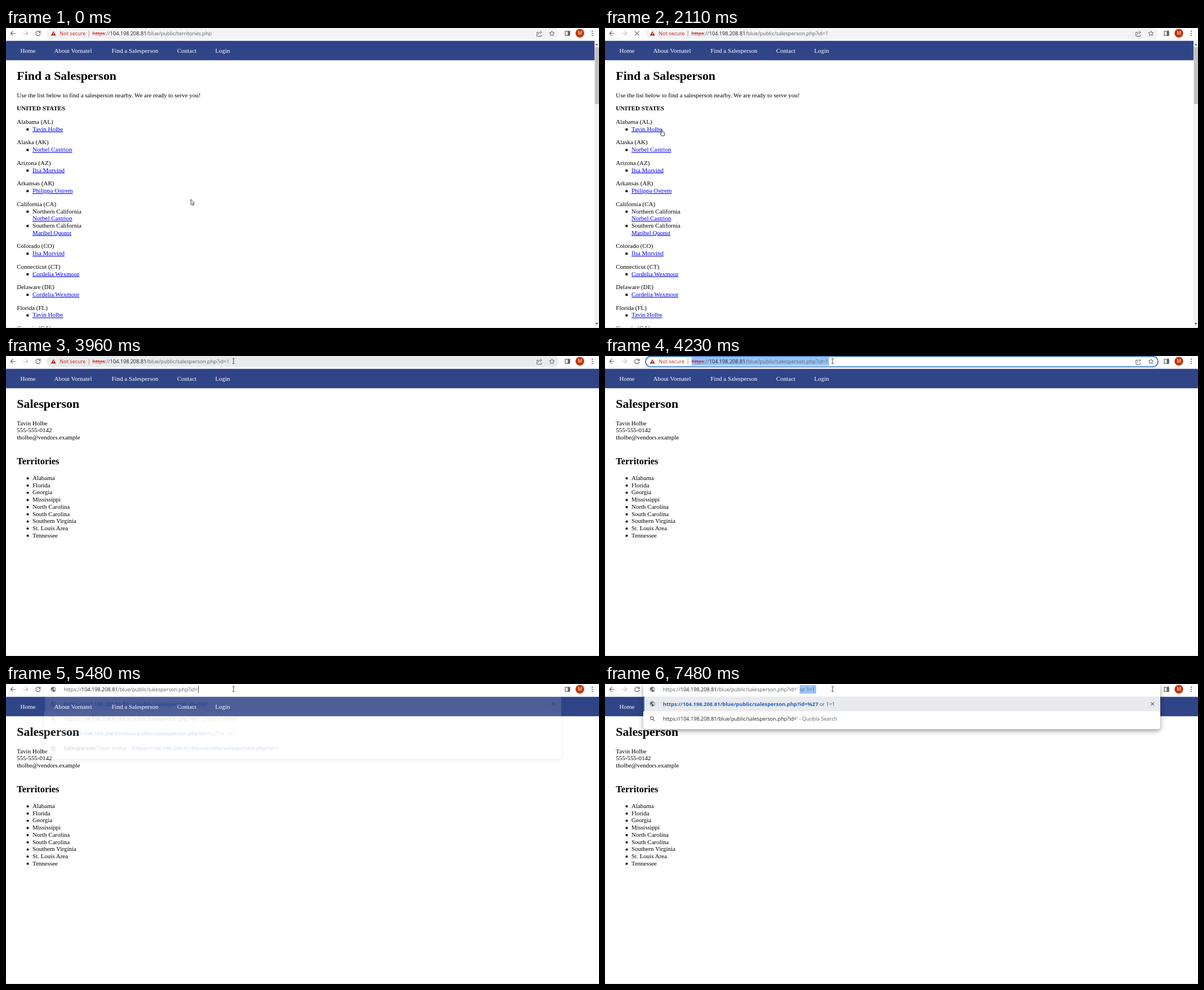
An HTML page that plays this animation: 1053x532 px, repeating every 8000 ms.

```html
<!DOCTYPE html>
<html lang="en">
<head>
<meta charset="utf-8">
<title>Find a Salesperson</title>
<style>
html, body { margin: 0; width: 100%; height: 100%; overflow: hidden; background: #fff; }
svg { display: block; width: 100vw; height: 100vh; }
.page { font: 10.97px "Liberation Serif", serif; fill: #000; }
.ui { font: 9.14px "Open Sans", sans-serif; fill: #5f6368; }
.h1 { font-size: 21.94px; font-weight: bold; }
.h2 { font-size: 16.45px; font-weight: bold; }
.b { font-size: 9.34px; font-weight: bold; }
.link { fill: #0000ee; text-decoration: underline; }
.nav { fill: #fff; }
.dark { fill: #202124; }
.red { fill: #c5221f; }
.blue { fill: #1b5fc9; }
.line { fill: none; stroke: #5f6368; stroke-width: 1.2; }
.struck { text-decoration: line-through; }
</style>
</head>
<body>
<svg id="stage" viewBox="0 0 1053 532" preserveAspectRatio="none"></svg>
<script>
const LOOP = 8000;
const LINE = 12.7;
const AGENT = "Tavin Holbe";
const HOST = "104.198.208.81";
const PATH = "/blue/public/";
const QUERY = PATH + "salesperson.php?id=";
const URL_TEXT = "https://" + HOST + QUERY;

const text = (x, y, content, cls = "", id = "") =>
  `<text x="${x}" y="${y}" class="${cls}" id="${id}">${content}</text>`;
const rect = (x, y, w, h, fill, extra = "") =>
  `<rect x="${x}" y="${y}" width="${w}" height="${h}" fill="${fill}" ${extra}/>`;
const path = (d, extra = 'class="line"') => `<path d="${d}" ${extra}/>`;
const group = (id, content, extra = "") => `<g id="${id}" ${extra}>${content}</g>`;
const span = (cls, content) => `<tspan class="${cls}">${content}</tspan>`;

const states = [
  ["Alabama (AL)", AGENT],
  ["Alaska (AK)", "Norbel Castrion"],
  ["Arizona (AZ)", "Ilsa Morvind"],
  ["Arkansas (AR)", "Philippa Ostrem"],
  ["California (CA)", "Northern California|Norbel Castrion", "Southern California|Maribel Quonst"],
  ["Colorado (CO)", "Ilsa Morvind"],
  ["Connecticut (CT)", "Cordelia Wexmoor"],
  ["Delaware (DE)", "Cordelia Wexmoor"],
  ["Florida (FL)", AGENT],
  ["Georgia (GA)"],
];
const territories = ["Alabama", "Florida", "Georgia", "Mississippi", "North Carolina",
  "South Carolina", "Southern Virginia", "St. Louis Area", "Tennessee"];

function stateList() {
  let y = 170, out = "";
  for (const [state, ...entries] of states) {
    out += text(19.3, y, state);
    for (const entry of entries) {
      const lines = entry.split("|");
      out += rect(36.4, y + LINE - 4.7, 3.8, 3.8, "#000");
      lines.forEach((line, i) => {
        y += LINE;
        out += text(47, y, line, i === lines.length - 1 ? "link" : "");
      });
    }
    y += 23.75;
  }
  return out;
}

const navBar = rect(0, 22.5, 1053, 34.7, "#304488") +
  [[25.5, "Home"], [85.5, "About Vornatel"], [187.5, "Find a Salesperson"], [304, "Contact"], [371.5, "Login"]]
    .map(([x, label]) => text(x, 44.4, label, "nav")).join("");

const scrollbar = rect(1045, 22.5, 8, 510, "#f1f1f1") + rect(1045.7, 34, 7.3, 101, "#c1c1c1") +
  path("M1046.8 30.5h4.6l-2.3-3z", 'fill="#505050"') + path("M1046.8 523h4.6l-2.3 3z", 'fill="#505050"');

const listPage = text(19.3, 92.4, "Find a Salesperson", "h1") +
  text(19.3, 122.7, "Use the list below to find a salesperson nearby. We are ready to serve you!") +
  text(19.3, 146.3, "<tspan font-weight='bold'>UNITED STATES</tspan>") + stateList() + scrollbar;

const personPage = text(19.3, 92.4, "Salesperson", "h1") +
  [AGENT, "555-555-0142", "tholbe@vendors.example"]
    .map((line, i) => text(19.3, 122.7 + i * LINE, line)).join("") +
  text(19.3, 192.4, "Territories", "h2") +
  territories.map((name, i) => {
    const y = 220 + i * 12.73;
    return `<circle cx="38.5" cy="${y - 3}" r="2"/>` + text(47, y, name);
  }).join("");

const globe = y => `<g transform="translate(84 ${y})"><circle r="4.5" fill="#5f6368"/>` +
  path("M-3.6-.5L-1 2v1.8C-2.6 3.2-3.6 1.5-3.6-.5zM0-3.6L2-3.1 1.6-1.7 0-1.3-.2 0 1.7.3 2.2 2.2 3.5 1V-.8L2.5-2.6-1.5-3z", 'fill="#fff"') + "</g>";
const cross = (x, y, r) => path(`M${x - r} ${y - r}l${2 * r} ${2 * r}m0 ${-2 * r}l${-2 * r} ${2 * r}`);

const toolbar = rect(0, 0, 1053, 22.5, "#fff") +
  path("M17 9.5H8.5M12.5 5.3L8.3 9.5l4.2 4.2") +
  path("M30 9.5h8.5M34.5 5.3l4.2 4.2-4.2 4.2", 'class="line" style="stroke:#bdc1c6"') +
  group("reload", path("M60.3 7.2A4.1 4.1 0 1 0 60.9 10.5") + path("M61.5 4.8v3.9h-3.9z", 'fill="#5f6368"')) +
  group("stop", cross(56.8, 9.5, 3.8)) +
  rect(993, 5.8, 8, 7.4, "none", 'class="line"') + rect(997.5, 5.5, 4, 8, "#5f6368") +
  '<circle cx="1019" cy="9.2" r="7.7" fill="#bf360c"/>' +
  text(1015.2, 12.4, "<tspan fill='#fff' font-size='8.6'>M</tspan>") +
  [5.7, 9.5, 13.3].map(y => `<circle cx="1041" cy="${y}" r="1.1"/>`).join("");

const restingField = rect(72, 0, 910, 19.3, "#f1f3f4", 'rx="9.65" id="pill"') +
  rect(72, 0.6, 910, 18.6, "#fff", 'rx="9.3" stroke="#1a66d2" stroke-width="1.6" id="ring"') +
  rect(154, 2, 244, 15, "#99c3f7", 'id="selectAll"') +
  path("M84.2 5.6l4.5 8h-9z", 'class="red"') + path("M84.2 8.2v2.7m0 .8v1", 'stroke="#fff" stroke-width=".9"') +
  text(95.3, 13, "Not secure", "red", "") + rect(146.8, 5, 0.9, 10, "#a08a8a") +
  text(153.6, 13, span("red struck", "https") + "://" + span("dark", HOST) + '<tspan id="address"></tspan>') +
  rect(397.6, 3, 0.8, 13, "#202124", 'id="endCaret"') +
  path("M946 7.5h-3.2v7h8v-2.5M945 11.5c.3-2.5 2-3.8 4.5-3.8M948.3 5.3l3 2.5-3 2.5", 'class="line" style="stroke-width:1"') +
  path("M969.4 5.2l1.3 2.9 3.2.3-2.4 2.1.7 3.1-2.8-1.6-2.8 1.6.7-3.1-2.4-2.1 3.2-.3z", 'class="line" style="stroke-width:1"');

const typedField = globe(9.5) +
  text(102.8, 13, "https://" + span("dark", HOST) + QUERY + '<tspan id="quote">\'</tspan>') +
  rect(341.3, 3, 0.8, 13, "#202124", 'id="typeCaret"') +
  group("completion", rect(343, 2, 32, 15, "#99c3f7", 'id="completionMark"') + text(345.8, 13, "or 1=1"));

const rowY = i => 38.5 + i * 26.3;
const boldUrl = (x, i, tail = "") => text(x, rowY(i), span("b", URL_TEXT) + tail, "blue");
const searchRow = tail => '<circle cx="83.2" cy="60.6" r="2.7" class="line"/>' + path("M85.2 62.6l3 3") +
  text(102.8, rowY(1), span("dark", URL_TEXT + tail) + " - Quobla Search");
const personRow = globe(114) +
  text(102.8, rowY(3), span("dark b", "Salesperson") + span("dark", ": " + AGENT) + " -") + boldUrl(224, 3, "1");
const firstSuggestions = boldUrl(102.8, 0) + searchRow("") + globe(87.7) + boldUrl(102.8, 2, "%27 or 1=1") + personRow;
const quoteSuggestions = boldUrl(102.8, 0, span("b", "%27") + " or 1=1") + searchRow("'");
const olderSuggestions = globe(87.7) + boldUrl(102.8, 2) + personRow;

const dropdown = path("", 'id="panel" fill="#fff" style="filter:drop-shadow(0 3px 4px #0006)"') +
  rect(68, 22.3, 918, 26, "#e8eaed") + rect(68, 22.3, 2, 26, "#1a73e8") +
  globe(35.3) + cross(972.3, 35.3, 2.9) +
  group("first", firstSuggestions) + group("quoted", quoteSuggestions) + group("older", olderSuggestions);

const status = rect(-2, 527, 216, 12, "#dfe1e5", 'rx="2" stroke="#c8cbd0" stroke-width=".7"');

const cursors =
  group("arrow", path("M0 0v9.6l2.2-2 1.5 3.2 1.5-.7-1.4-3h2.9z", 'fill="#fff" stroke="#25233f" stroke-width=".9"')) +
  group("hand", path("M-.9 1c0-1.3 1.8-1.3 1.8 0v3.2l3.2.9c.7.2 1 .7.9 1.5l-.7 4.6h-5L-2.7 7.5c-.6-1 .6-1.6 1.8-.4z",
    'fill="#fff" stroke="#202124" stroke-width=".9"')) +
  group("beam", path("M-2-4.4h1.5l.5.5.5-.5H2M0-4v8M-2 4.4h1.5l.5-.5.5.5H2", 'fill="none" stroke="#333" stroke-width=".9"'));

document.getElementById("stage").innerHTML =
  group("pages", navBar + group("listPage", listPage) + group("personPage", personPage), 'class="page"') +
  rect(0, 530.7, 1053, 1.3, "#e3e8ea") + group("status", status) +
  group("chrome", toolbar + group("restingField", restingField) +
    group("dropdown", dropdown) + group("typedField", typedField), 'class="ui"') +
  group("cursor", cursors);

const el = Object.fromEntries([...document.querySelectorAll("[id]")].filter(e => e.id).map(e => [e.id, e]));
const show = (id, on) => { el[id].style.display = on ? "" : "none"; };
const between = (t, from, to) => t >= from && t < to;
const ease = p => p * p * (3 - 2 * p);
const mix = (a, b, p) => a + (b - a) * p;

// Progress from 0 to 1 in n equal jumps, the first at start and the last at end.
function stepped(t, start, end, n) {
  if (t < start) return 0;
  return Math.min(n, Math.floor((t - start) / (end - start) * (n - 1) + 1e-6) + 1) / n;
}

function cursorAt(t) {
  if (t < 2380) {
    const p = ease(stepped(t, 320, 1060, 12));
    return [mix(328.3, 101, p), mix(303.8, 180, p), p === 1 ? "hand" : "arrow"];
  }
  if (t >= 3540) return [404, 9, "beam"];
  const p = ease(stepped(t, 2710, 3340, 10));
  const y = mix(180, 7.5, p);
  return [mix(101, 405, p), y, y < 19 ? "beam" : "arrow"];
}

function draw(t) {
  const loaded = t >= 2380, typing = t >= 5480, quoted = t >= 6480;
  show("listPage", !loaded);
  show("personPage", loaded);
  show("stop", between(t, 1320, 2380));
  show("reload", !between(t, 1320, 2380));
  el.status.style.opacity = stepped(t, 1190, 1320, 3) - stepped(t, 1980, 2110, 3);

  const [x, y, kind] = cursorAt(t);
  el.cursor.setAttribute("transform", `translate(${x} ${y})`);
  for (const name of ["arrow", "hand", "beam"]) show(name, name === kind);

  show("restingField", !typing);
  el.address.textContent = t < 1720 ? PATH + "territories.php" : QUERY + "1";
  el.pill.setAttribute("fill", kind === "beam" ? "#e8eaed" : "#f1f3f4");
  el.ring.style.opacity = stepped(t, 4090, 4230, 3);
  show("selectAll", between(t, 4090, 5080));
  show("endCaret", t >= 5080);

  show("typedField", typing);
  show("quote", quoted);
  show("typeCaret", between(t, 5480, 6010));
  show("completion", quoted);
  const markX = t < 7480 ? 343 : 345.7;
  el.completionMark.setAttribute("x", markX);
  el.completionMark.setAttribute("width", 375 - markX);

  show("dropdown", typing);
  el.dropdown.style.opacity = t < 5540 ? 0.15 : 1;
  show("first", !quoted);
  show("quoted", quoted);
  show("older", between(t, 6480, 6550));
  const bottom = t < 6550 ? 132.5 : 80;
  el.panel.setAttribute("d", `M68 0H986V${bottom - 5}q0 5-5 5H73q-5 0-5-5z`);
}

function frame() {
  draw(performance.now() % LOOP);
  requestAnimationFrame(frame);
}
frame();
</script>
</body>
</html>
```
